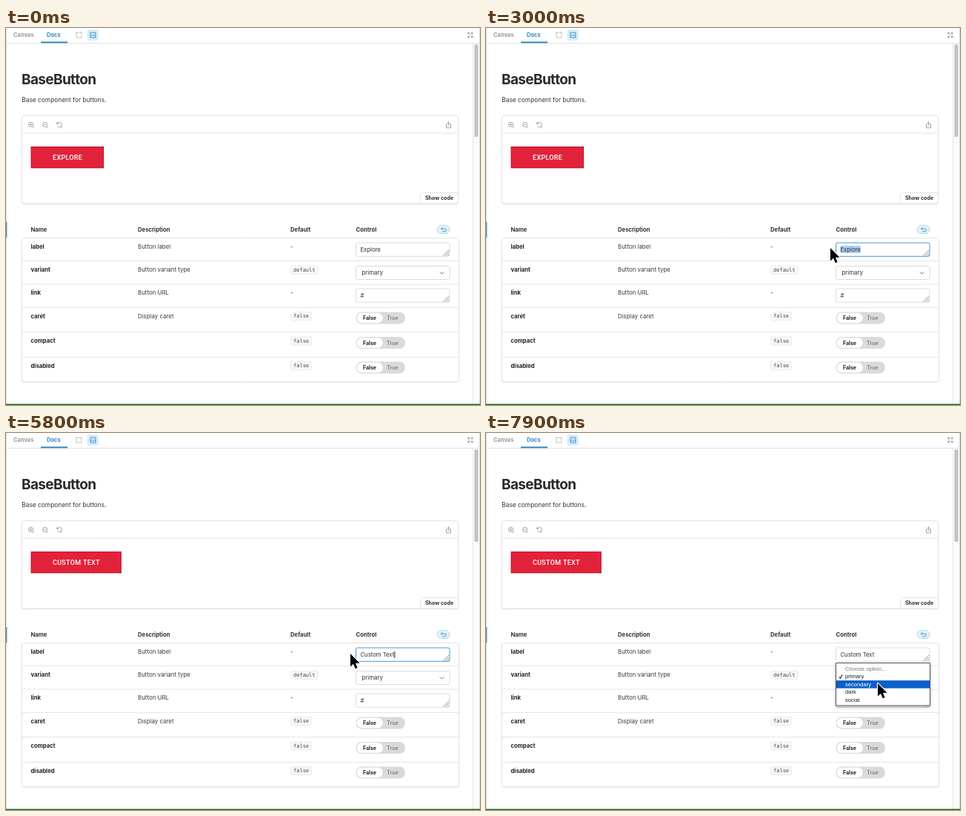
Write an HTML page with a canvas that moves like this. It is 640 px wide and 509 px high and loops after 8 s.

```html
<!DOCTYPE html>
<html lang="en">
<head>
<meta charset="utf-8">
<title>Component docs</title>
<style>
html, body { margin: 0; width: 100%; height: 100%; overflow: hidden; background: #fff; }
canvas { display: block; width: 640px; height: 509px; }
</style>
</head>
<body>
<canvas id="stage"></canvas>
<script>
const W = 640, H = 509, LOOP = 8000, TICK = 100;
const canvas = document.getElementById('stage');
const dpr = window.devicePixelRatio || 1;
canvas.width = W * dpr;
canvas.height = H * dpr;
const ctx = canvas.getContext('2d');

const UI = 'Inter, sans-serif';
const MONO = '"DejaVu Sans Mono", monospace';
const MENU = '"Liberation Sans", sans-serif';
const INK = '#2e2e2e', GREY = '#999', LINE = '#e3e3e3', BLUE = '#2f8bc4';

// [time, x, y] of the pointer tip
const firstMove = [
  [1400, 499, 456], [1700, 508, 400], [2000, 527, 315], [2200, 533, 296],
  [2300, 562, 276], [2400, 586, 262], [2500, 586, 262], [2600, 558, 285],
  [2700, 518, 298], [2800, 496, 298], [2900, 478, 298], [3000, 465, 297]
];
const secondMove = [
  [5800, 465, 298], [6000, 474, 306], [6300, 508, 328], [6500, 518, 334],
  [6600, 520, 338], [6900, 521, 336], [7100, 523, 332], [7400, 526, 331],
  [7600, 528, 335], [7900, 529, 338]
];
const typed = 'Custom Text';
const keyTimes = [3800, 4000, 4400, 4800, 4900, 5000, 5100, 5300, 5500, 5600, 5800];
const options = ['Choose option...', 'primary', 'secondary', 'dark', 'social'];

const within = (t, a, b) => t >= a && t < b;

function follow(path, t) {
  let i = 0;
  while (i < path.length - 2 && t >= path[i + 1][0]) i++;
  const [t0, x0, y0] = path[i], [t1, x1, y1] = path[i + 1];
  const k = Math.min(1, Math.max(0, (t - t0) / (t1 - t0)));
  return { x: x0 + (x1 - x0) * k, y: y0 + (y1 - y0) * k };
}

function text(str, x, y, size, opt = {}) {
  ctx.font = `${opt.weight || 400} ${size}px ${opt.family || UI}`;
  ctx.letterSpacing = (opt.spacing || 0) + 'px';
  ctx.textAlign = opt.align || 'left';
  ctx.fillStyle = opt.color || INK;
  ctx.fillText(str, x, y);
}

function textWidth(str, font, spacing = 0) {
  ctx.font = font;
  ctx.letterSpacing = spacing + 'px';
  return ctx.measureText(str).width;
}

function rect(x, y, w, h, color) {
  ctx.fillStyle = color;
  ctx.fillRect(x, y, w, h);
}

function box(x, y, w, h, r, fill, stroke, lw = 1) {
  ctx.beginPath();
  ctx.roundRect(x, y, w, h, r);
  if (fill) { ctx.fillStyle = fill; ctx.fill(); }
  if (stroke) { ctx.strokeStyle = stroke; ctx.lineWidth = lw; ctx.stroke(); }
}

function card(x, y, w, h) {
  ctx.save();
  ctx.shadowColor = 'rgba(0,0,0,.12)';
  ctx.shadowBlur = 2 * dpr;
  ctx.shadowOffsetY = dpr;
  box(x, y, w, h, 3, '#fff');
  ctx.restore();
  box(x, y, w, h, 3, null, LINE);
}

function stroke(d, x, y, color, lw = 1) {
  ctx.save();
  ctx.translate(x, y);
  ctx.strokeStyle = color;
  ctx.lineWidth = lw;
  ctx.stroke(new Path2D(d));
  ctx.restore();
}

function toolbar() {
  rect(0, 20, W, 1, LINE);
  text('Canvas', 10, 12, 7.5, { weight: 700, color: GREY });
  text('Docs', 55, 12, 7.5, { weight: 700, color: BLUE });
  rect(47, 18.4, 36, 2, BLUE);

  ctx.setLineDash([1.2, 1.2]);
  stroke('M-3.5 -3.5H3.5V3.5H-3.5Z', 98.5, 9.5, '#888', 1);
  ctx.setLineDash([]);

  box(109.5, 2, 15.5, 15, 2, '#dceefa');
  stroke('M-3.5 -3.5H3.5V3.5H-3.5ZM-3.5 2L-1 -.5L.8 1.2L2 .2L3.5 1.6M1.2 -1.6H2', 117.5, 9.5, BLUE, .9);
  stroke('M-3 -1V-3H-1M1 -3H3V-1M3 1V3H1M-1 3H-3V1M-3 -3L-.8 -.8M3 -3L.8 -.8M3 3L.8 .8M-3 3L-.8 .8',
    627, 9.5, '#888', .9);
}

function frameEdges() {
  rect(630, 21, 1, 487, '#e8e8e8');
  rect(631, 21, 8, 487, '#fafafa');
  box(632.5, 22, 5, 125, 2.5, '#c1c1c1');
  rect(639, 0, 1, 508, '#dcdcdc');
  rect(0, 0, 1, 508, '#dcdcdc');
  rect(0, 262, 1.4, 21, '#4b93c8');
  rect(0, 507.6, W, 1.4, '#126a12');
}

function zoomIcon(x, sign) {
  stroke('M2.6 -.6A3.1 3.1 0 1 1 -3.6 -.6A3.1 3.1 0 1 1 2.6 -.6M1.8 1.8L4 4' + sign, x, 131, GREY, .9);
}

function preview(label) {
  card(21.5, 118.5, 589, 118.5);
  rect(22, 141.5, 588, 1, LINE);
  zoomIcon(34, 'M-2 -.6H1M-.5 -2.1V.9');
  zoomIcon(53, 'M-2 -.6H1');
  stroke('M-3.3 -3.5V-1H-.8M-3 -1.2A3.3 3.3 0 1 1 -2.6 2M1.6 1.8L3.8 4', 72, 130.5, GREY, .9);
  stroke('M-1.4 -1.2H-3V3.8H3V-1.2H1.4M0 1.2V-4M-1.6 -2.5L0 -4L1.6 -2.5', 597.5, 131, GREY, .9);

  const caption = label.trim().toUpperCase();
  const style = { weight: 500, family: 'Roboto, sans-serif', spacing: .3, color: '#fff' };
  const width = 58.5 + textWidth(caption, `500 9px ${style.family}`, style.spacing);
  rect(33.5, 160, width, 29.3, '#b3152c');
  rect(34.3, 160.8, width - 1.6, 27.7, '#e2223a');
  text(caption, 63, 178.3, 9, style);

  box(559.5, 222.5, 51, 14.5, [3, 0, 3, 0], '#fff', LINE);
  text('Show code', 585, 232, 7.1, { weight: 700, align: 'center' });
}

function code(str, y) {
  const w = textWidth(str, `7px ${MONO}`);
  box(384.5, y - 5.5, w + 7, 11, 2, '#f8f8f8', '#ececec');
  text(str, 388, y + 2.4, 7, { family: MONO, color: '#444' });
}

function textarea(y, focused) {
  box(472.5, y, 126.5, 18.3, 2, '#fff', focused ? '#4a97cf' : '#dcdcdc');
  stroke('M0 0L-8 8M0 3L-5 8M0 6L-2 8', 598.3, y + 9.6, '#777', .8);
}

function toggle(y) {
  box(472.5, y - 8, 66.5, 16, 8, '#dadada');
  box(473.3, y - 7.2, 36, 14.4, 7.2, '#fff', '#d2d2d2', .6);
  text('False', 491, y + 2.6, 7, { weight: 700, align: 'center', color: '#222' });
  text('True', 522, y + 2.6, 7, { weight: 600, align: 'center', color: '#7d7d7d' });
}

function table() {
  const head = { weight: 700, color: '#333' };
  [['Name', 33.5], ['Description', 178], ['Default', 384], ['Control', 472.5]]
    .forEach(([s, x]) => text(s, x, 274.8, 7.7, head));
  box(582, 266.5, 17, 11, 5.5, '#e3f1fb', '#b5d9f1');
  stroke('M-1.6 -3L-3.4 -1.3L-1.6 .4M-3.4 -1.3H1.6A1.8 1.8 0 0 1 1.6 2.4H-1.6', 590.8, 272.3, BLUE, .9);

  card(21.5, 283.5, 590, 194);
  [314, 345.5, 377, 410, 444].forEach(y => rect(22, y, 589, 1, '#e6e6e6'));
  const rows = [
    ['label', 'Button label', '-', 295.5], ['variant', 'Button variant type', 'default', 326.7],
    ['link', 'Button URL', '-', 357.7], ['caret', 'Display caret', 'false', 389],
    ['compact', '', 'false', 422.5], ['disabled', '', 'false', 456]
  ];
  for (const [name, info, value, y] of rows) {
    text(name, 33.5, y + 2.7, 7.7, { weight: 700, color: '#222' });
    text(info, 178, y + 2.7, 7.9, { color: '#3a3a3a' });
    if (value === '-') text('-', 384, y + 2.7, 7.9);
    else code(value, y);
  }
}

function controls(t, label, pointer) {
  const focused = within(t, 2700, 6900);
  textarea(290, focused);
  const end = 478.5 + textWidth(label, `7.7px ${UI}`);
  if (within(t, 2800, 3800)) {
    const from = Math.max(478.5, Math.min(end, pointer ? pointer.x : 0));
    rect(from, 294, end - from, 10, '#a9d0f5');
  }
  text(label, 478.5, 301.8, 7.7);
  const blinkOff = within(t, 4600, 4800) || within(t, 6200, 6700);
  if (within(t, 3800, 6900) && !blinkOff) rect(end + .2, 294.8, .9, 9.2, '#111');

  box(472.5, 321.5, 126.5, 18, 2, '#fff', '#dcdcdc');
  text('primary', 480.5, 333, 7.8);
  stroke('M-2.7 -1.3L0 1.4L2.7 -1.3', 588.5, 330.7, '#666', 1);

  textarea(352, false);
  text('#', 478.5, 364.2, 7.7);
  [391.5, 425, 458.5].forEach(toggle);
}

function menu(pointer) {
  const top = 313, rowH = 10.55;
  const active = Math.floor((pointer.y - top) / rowH);
  ctx.save();
  ctx.shadowColor = 'rgba(0,0,0,.3)';
  ctx.shadowBlur = 4 * dpr;
  ctx.shadowOffsetY = 1.5 * dpr;
  rect(472, 310, 128, 58.5, '#fff');
  ctx.restore();
  box(472.5, 310.5, 127, 57.5, 0, '#fff', '#555');
  options.forEach((name, i) => {
    const y = top + i * rowH, on = i === active;
    if (on) rect(473, y, 126, rowH, '#0a60c8');
    const color = on ? '#fff' : i ? '#1c1c1c' : '#777';
    text(name, 485, y + 7.8, 7.6, { family: MENU, color });
    if (i === 1) stroke('M-2 .2L-.6 2.2L2 -2.6', 479, y + 5.4, color, 1.1);
  });
}

function drawPointer({ x, y }) {
  const arrow = new Path2D('M0 0V17.4L4 13.7L6.7 20.2L9.6 19L6.9 12.7H12.5Z');
  ctx.save();
  ctx.translate(x, y);
  ctx.lineJoin = 'round';
  ctx.strokeStyle = '#fff';
  ctx.lineWidth = 2.2;
  ctx.stroke(arrow);
  ctx.fillStyle = '#000';
  ctx.fill(arrow);
  ctx.restore();
}

function ring({ x, y }) {
  ctx.beginPath();
  ctx.arc(x - 3, y - 1, 25.5, 0, Math.PI * 2);
  ctx.strokeStyle = '#111';
  ctx.lineWidth = 2;
  ctx.stroke();
}

function draw(t) {
  ctx.setTransform(dpr, 0, 0, dpr, 0, 0);
  rect(0, 0, W, H, '#fff');

  let pointer = null;
  if (within(t, 1400, 3600)) pointer = follow(firstMove, t);
  else if (t >= 5800) pointer = follow(secondMove, t);
  const count = keyTimes.filter(k => t >= k).length;
  const label = count ? typed.slice(0, count) : 'Explore';

  toolbar();
  frameEdges();
  text('BaseButton', 21, 75.8, 19, { weight: 700, spacing: -.65, color: '#2a2a2a' });
  text('Base component for buttons.', 21.3, 99.8, 8.35, { color: '#333' });
  preview(label);
  table();
  controls(t, label, pointer);
  if (t >= 7100) menu(pointer);
  if (within(t, 1400, 2600)) ring(pointer);
  if (pointer) drawPointer(pointer);
}

const start = performance.now();
function tick() {
  const t = (performance.now() - start) % LOOP;
  draw(Math.floor(t / TICK) * TICK);
  requestAnimationFrame(tick);
}
tick();
</script>
</body>
</html>
```
